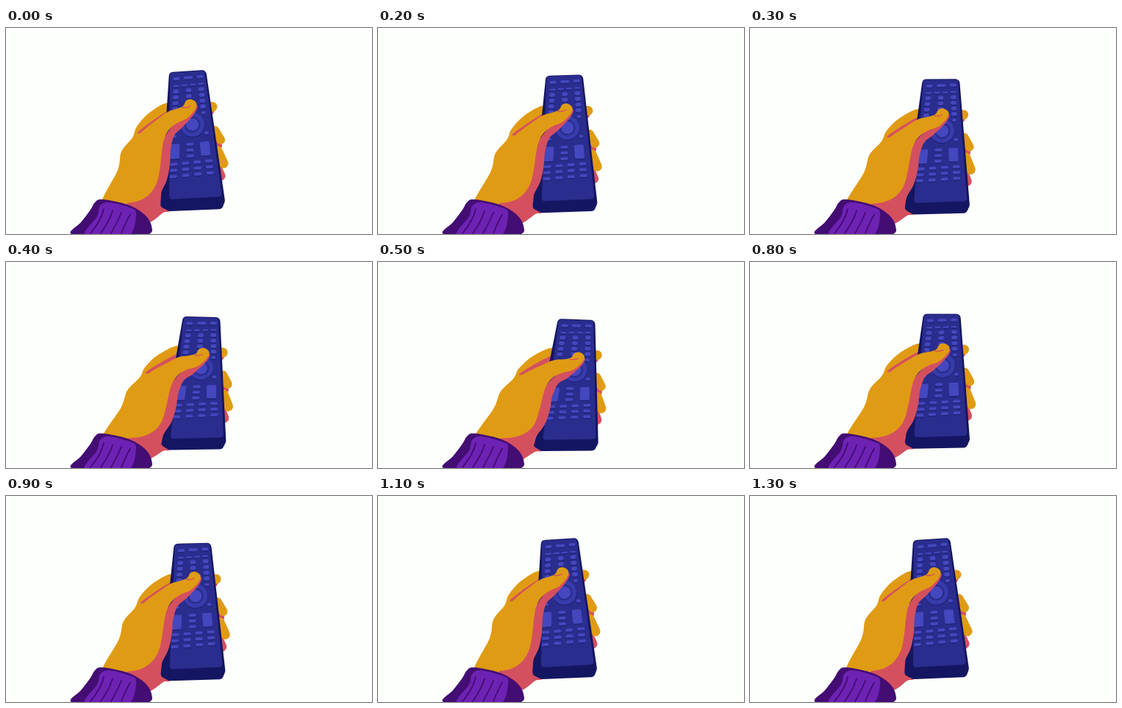
These frames come from a looping animation (498 by 280 pixels, 1400 ms). An HTML page with a canvas:

```html
<!DOCTYPE html>
<html lang="en">
<head>
<meta charset="utf-8">
<title>Remote control</title>
<style>
html, body { margin: 0; width: 100%; height: 100%; overflow: hidden; background: #fdfffc; }
canvas { display: block; }
</style>
</head>
<body>
<canvas id="stage" width="498" height="280"></canvas>
<script>
const ctx = document.getElementById('stage').getContext('2d');
const LOOP = 1400, STEP = 50, PEAK = 575, REST = 1080;
const color = {
  paper: '#fdfffc', skin: '#e09b14', shade: '#d4505f',
  face: '#2a2d8d', edge: '#141662', groove: '#1f2278', ring: '#383bab', key: '#4447bd',
  sleeve: '#6e22b4', fold: '#430d73'
};

// Everything is drawn in the raised pose; tilt and press bend it into the others.
const path = text => text.split(' ').map(xy => xy.split(',').map(Number));
const body = path('222,60 272,57 298,235 294,246 222,249 210,243');
const face = path('223,61 270,58 294,229 222,233');
const keypad = path('232,69 264,66 277,197 227,202');
const heel = path('196,215 222,210 224,246 214,251 196,264 180,262');
const palm = path('165,236 200,200 215,150 250,108 260,105 259,112 252,122 240,135 229,146 ' +
                  '224,165 223,185 219,206 211,224 208,242 196,262 170,262');
const back = path('130,240 152,193 157,168 172,149 178,134 194,116 219,102 221,120 200,150 190,200 165,238');
const crease = path('179,143 194,130 222,112 222,124 200,138');
const thumb = path('150,215 165,168 182,144 206,124 220,114 232,110 241,106 245,99 252,97 259,102 257,111 ' +
                   '246,123 233,129 222,138 215,151 212,168 210,187 206,208 197,224 183,234 165,238 145,240');
const knuckle = path('240,108 246,109 251,106');
const cuff = path('89,280 102,264 115,247 121,237 131,233 165,240 188,253 198,269 192,281 140,284');
const cuffLight = path('107,281 124,256 128,242 140,237 168,244 177,252 169,281 140,284');

const lerp = (a, b, t) => a + (b - a) * t;
const clamp = v => Math.max(0, Math.min(1, v));
const mixPoint = (a, b, t) => [lerp(a[0], b[0], t), lerp(a[1], b[1], t)];

// The arm pivots on the wrist, so motion grows with distance from it.
let lowered = 0;
function tilt([x, y]) {
  const rise = 249 - y;
  const amount = lowered * clamp(Math.hypot(x - 150, y - 250) / 70);
  const drop = 8 + 0.048 * rise + (x - 222) * (0.03 + 0.00036 * rise);
  return [x + amount * 0.122 * rise, y + amount * drop];
}

// The thumb side of the hand also presses down further.
function press(p) {
  const [x, y] = tilt(p), amount = lowered ** 2 * clamp((p[0] - 180) / 60);
  return [x + 4 * amount, y + 8 * amount];
}

function fillPath(fill) {
  ctx.closePath();
  ctx.fillStyle = fill;
  ctx.fill();
}

function blob(points, fill) {
  const n = points.length, at = i => points[(i + n) % n];
  ctx.beginPath();
  ctx.moveTo(...points[0]);
  for (let i = 0; i < n; i++) {
    const [a, b, c, d] = [at(i - 1), at(i), at(i + 1), at(i + 2)];
    ctx.bezierCurveTo(b[0] + (c[0] - a[0]) / 6, b[1] + (c[1] - a[1]) / 6,
                      c[0] - (d[0] - b[0]) / 6, c[1] - (d[1] - b[1]) / 6, ...c);
  }
  fillPath(fill);
}

function roundPoly(points, radius, fill) {
  const n = points.length;
  ctx.beginPath();
  ctx.moveTo(...mixPoint(points[n - 1], points[0], 0.5));
  points.forEach((p, i) => ctx.arcTo(...p, ...points[(i + 1) % n], radius));
  fillPath(fill);
}

function line([a, b, c], width, stroke) {
  ctx.beginPath();
  ctx.moveTo(...a);
  ctx.quadraticCurveTo(...b, ...c);
  ctx.lineWidth = width;
  ctx.lineCap = 'round';
  ctx.strokeStyle = stroke;
  ctx.stroke();
}

// A capsule from a to b, with its shaded underside below and behind.
function finger(a, b, width, drop) {
  const stroke = (dx, dy, fill) => {
    const [from, to] = [a, b].map(([x, y]) => tilt([x + dx, y + dy]));
    line([from, mixPoint(from, to, 0.5), to], width, fill);
  };
  stroke(-4, drop, color.shade);
  stroke(0, 0, color.skin);
}

function drawKeys() {
  const [tl, tr, br, bl] = keypad;
  const place = (u, v) => mixPoint(mixPoint(tl, tr, u), mixPoint(bl, br, u), v);
  const key = (u, v, w, h, radius = 1.6) => {
    const [x, y] = place(u, v);
    const corners = [[-1, -1], [1, -1], [1, 1], [-1, 1]].map(([i, j]) => {
      const dx = i * w / 2, dy = j * h / 2;
      return tilt([x + dx + dy * lerp(-0.02, 0.12, u), y + dy - dx * 0.07]);
    });
    roundPoly(corners.map(([cx, cy]) => [cx, cy + 1.3]), radius, color.groove);
    roundPoly(corners, radius, color.key);
  };
  const disc = (u, v, r, fill) => {
    const [x, y] = place(u, v);
    blob(Array.from({ length: 12 }, (_, i) => {
      const a = i * Math.PI / 6;
      return tilt([x + r * Math.cos(a), y + r * Math.sin(a)]);
    }), fill);
  };

  for (let col = 0; col < 3; col++) {
    const u = col / 2;
    key(u, 0, col === 1 ? 12 : 9, 4);
    for (let row = 0; row < 4; row++) key(u, 0.13 + row * 0.06, 8, 5.4, 2.6);
    key(0.49, 0.685 + col * 0.06, 10, 4);
  }
  for (let col = 0; col < 4; col++) {
    const u = col / 3;
    key(u, 0.075, 8, 2.4, 1);
    for (let row = 0; row < 3; row++) key(u + 0.015, 0.875 + row * 0.0625, 10, 4);
  }
  key(1, 0.375, 6, 4, 2);
  key(0, 0.59, 6, 4, 2);
  key(1.03, 0.585, 6, 4, 2);
  disc(0.59, 0.492, 17, color.groove);
  disc(0.59, 0.485, 16.5, color.ring);
  disc(0.59, 0.485, 11, color.face);
  disc(0.59, 0.485, 8.5, color.key);
  key(0.03, 0.745, 13, 20);
  key(0.94, 0.745, 13, 19);
}

function drawSleeve() {
  blob(cuff, color.fold);
  blob(cuffLight, color.sleeve);
  for (let i = 0; i < 4; i++) {
    line([[133 + 12 * i, 246 + 2.5 * i], [130 + 11 * i, 261 + i], [115 + 14 * i, 279]], 1.8, color.fold);
  }
}

// Eased swing: down until PEAK, back by REST, then still.
function swing(t) {
  const phase = t < PEAK ? t / PEAK : 1 - clamp((t - PEAK) / (REST - PEAK));
  return 0.52 * (1 - Math.cos(Math.PI * phase));
}

function draw(t) {
  lowered = swing(t);
  ctx.fillStyle = color.paper;
  ctx.fillRect(0, 0, 498, 280);

  finger([276, 107], [281, 107], 13, 5);
  finger([284, 139], [292, 152], 12, 8);
  finger([288, 167], [296, 184], 13, 17);
  blob(heel.map(tilt), color.shade);
  blob(back.map(tilt), color.skin);
  blob(crease.map(tilt), color.shade);

  roundPoly(body.map(tilt), 6, color.edge);
  roundPoly(face.map(tilt), 4, color.face);
  drawKeys();

  blob(palm.map(press), color.shade);
  blob(thumb.map(press), color.skin);
  line(knuckle.map(press), 1.3, color.shade);
  drawSleeve();
}

function tick() {
  const t = performance.now() % LOOP;
  draw(Math.floor(t / STEP) * STEP);
  requestAnimationFrame(tick);
}
tick();
</script>
</body>
</html>
```
